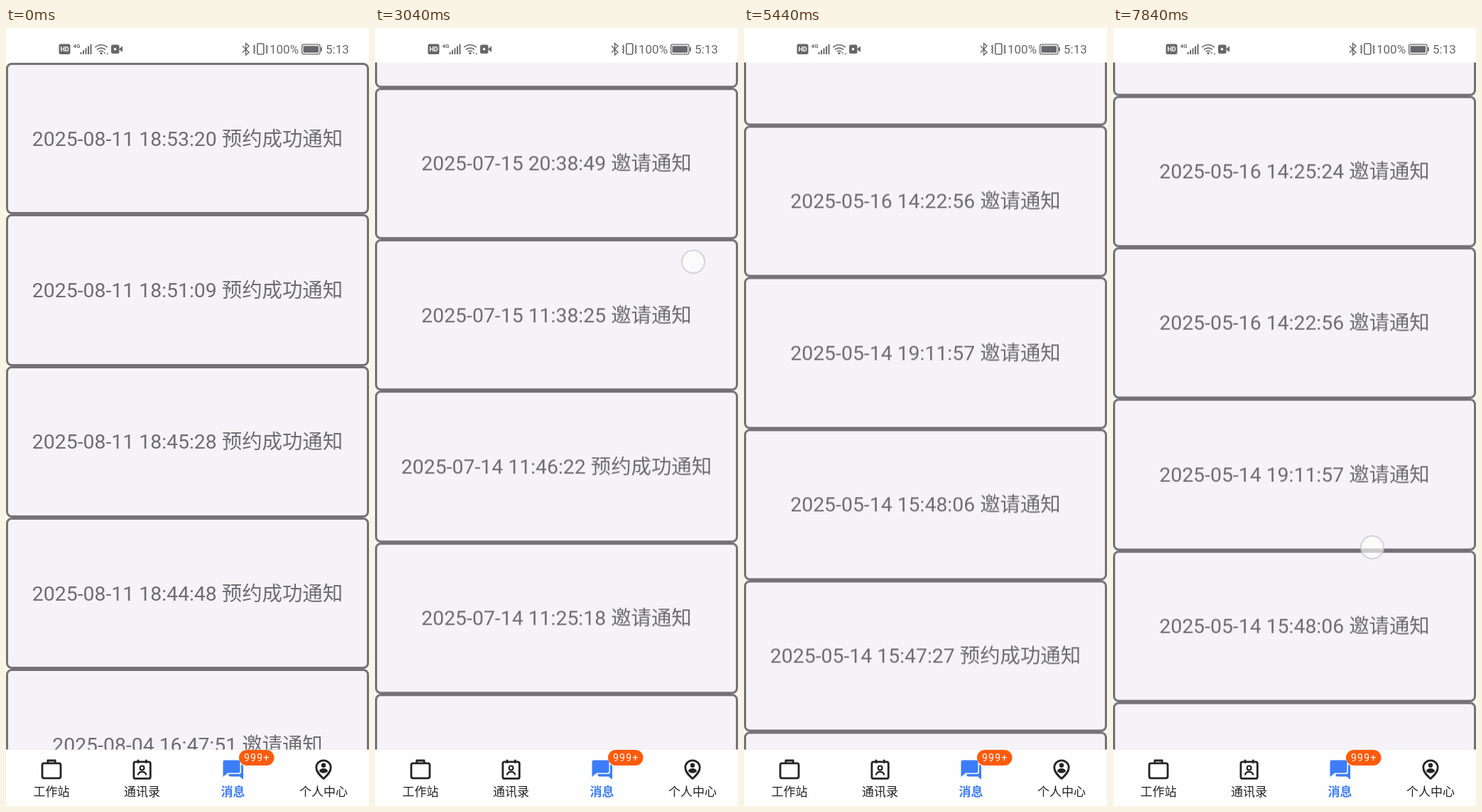
Recreate the animation shown at these times as an HTML page. Size 511 by 1095 pixels, loop 8000 ms.

```html
<!DOCTYPE html>
<html lang="zh-CN">
<head>
<meta charset="utf-8">
<title>消息</title>
<style>
html, body { margin: 0; width: 100%; height: 100%; overflow: hidden; background: #fff; }
body { position: relative; font-family: Roboto, "Noto Sans CJK SC", "Noto Sans CJK", sans-serif; }
#view { position: absolute; left: 0; top: 48px; width: 511px; height: 968px; overflow: hidden; }
#list { position: absolute; left: 0; top: .5px; width: 511px; will-change: transform; }
.row {
  box-sizing: border-box; height: 213.33px; padding-top: 1.6px;
  border: 3px solid #747277; border-radius: 8px; background: #f5f3f7;
  color: #6e6d72; font-size: 28.4px; line-height: 206px;
  text-align: center; white-space: nowrap;
}
#glow {
  position: absolute; left: -195px; top: 932px; width: 900px; height: 300px;
  border-radius: 50%; background: #e8e2e8; opacity: 0;
}
#chrome { position: absolute; left: 0; top: 0; display: block; }
text { font-family: Roboto, "Noto Sans CJK SC", "Noto Sans CJK", sans-serif; }
.status { fill: #68676b; }
.line { fill: none; stroke: #68676b; stroke-width: 1.6; }
.icon { fill: none; stroke: #242426; stroke-width: 2.8; stroke-linejoin: round; }
.label { font-size: 17px; text-anchor: middle; fill: #222; }
</style>
</head>
<body>
<div id="view">
  <div id="list"></div>
  <div id="glow"></div>
</div>
<svg id="chrome" width="511" height="1095" viewBox="0 0 511 1095">
  <!-- status bar -->
  <rect width="511" height="48.5" fill="#fff"/>
  <g class="status">
    <rect x="74.5" y="22.5" width="16" height="14.5" rx="2.5"/>
    <text x="82.5" y="33.2" font-size="9" font-weight="700" fill="#fff" text-anchor="middle">HD</text>
    <text x="94.5" y="28" font-size="8" font-weight="700">4G</text>
    <g id="bars"></g>
    <rect x="148" y="23.5" width="11.5" height="12.5" rx="2.5"/>
    <path d="M159 29.7 164 25.5V34Z"/>
    <circle cx="153.5" cy="29.7" r="1.8" fill="#fff"/>
    <circle cx="134" cy="35.6" r="1.7"/>
    <path d="M137.5 34h2v3.5zM141.5 37.5h2V34z"/>
    <text x="371" y="36" font-size="17">100%</text>
    <text x="450" y="36" font-size="17">5:13</text>
    <rect x="418.5" y="25.3" width="21.5" height="9.4" rx="1"/>
    <rect x="443" y="27" width="1.8" height="6" rx=".8"/>
  </g>
  <g class="line">
    <path d="M125.2 27.3a12.6 12.6 0 0 1 17.6 0M128 30.6a8.6 8.6 0 0 1 12 0M130.8 33.4a4.8 4.8 0 0 1 6.4 0"/>
    <path d="M333 25.2 342 34.2 337.6 38V21.5L342 25.4 333 34.4" stroke-width="1.4"/>
    <rect x="353.8" y="22" width="9" height="15" rx="1.5"/>
    <path d="M350.3 24l-1.4 2 1.4 2-1.4 2 1.4 2-1.4 2 1.4 2M366.4 24l1.4 2-1.4 2 1.4 2-1.4 2 1.4 2-1.4 2"/>
    <rect x="416.6" y="23.2" width="25.4" height="13.6" rx="2.5" stroke-width="1.3"/>
  </g>

  <!-- tab bar -->
  <rect y="1015.5" width="511" height="1" fill="#ececee"/>
  <rect y="1016" width="511" height="79" fill="#fefefe"/>
  <g class="icon">
    <rect x="51" y="1034.8" width="26" height="21" rx="2.5"/>
    <path d="M58.8 1034.5V1031h10.4v3.5"/>
    <rect x="179.9" y="1032.8" width="23.4" height="23.6" rx="2.5"/>
    <path d="M186 1029.8v5M197.3 1029.8v5"/>
    <circle cx="191.6" cy="1041.4" r="2.9" stroke-width="2.2"/>
    <path d="M185.8 1051.5c1-6.2 10.6-6.2 11.6 0" stroke-width="2.3"/>
    <path d="M447 1056.5c-5-4.500-10.200-9.300-10.200-15.500a10.200 10.200 0 0 1 20.400 0c0 6.200-5.200 11-10.200 15.500Z"/>
    <g fill="#242426" stroke="none">
      <circle cx="447" cy="1037.800" r="3.200"/>
      <path d="M440.800 1046c1.200-5.500 11.200-5.500 12.400 0-3.500 3.600-8.900 3.600-12.400 0Z"/>
    </g>
  </g>
  <g fill="#3d7dfa">
    <path d="M331 1037h1q2 0 2 2.500v18.300l-5-4.300h-13q-2.500 0-2.500-2.500v-1h14.500q3 0 3-3Z"/>
    <path d="M308 1030h19q3 0 3 3v13q0 3-3 3h-15l-7 6v-22q0-3 3-3Z" stroke="#fefefe" stroke-width="1"/>
  </g>
  <text class="label" x="64" y="1081">工作站</text>
  <text class="label" x="191.500" y="1081">通讯录</text>
  <text class="label" x="319.500" y="1081" font-weight="700" style="fill:#3d7dfa">消息</text>
  <text class="label" x="447" y="1081">个人中心</text>
  <rect x="328" y="1016" width="49.500" height="22" rx="11" fill="#ff5b0b"/>
  <text x="353.300" y="1032" font-size="14" letter-spacing="1.300" fill="#fff" text-anchor="middle">999+</text>

  <circle id="touch" r="16" fill="#fff" fill-opacity=".62" stroke="#c9c7d0" stroke-opacity=".75" stroke-width="2"/>
</svg>
<script>
const LOOP = 8000, TICK = 160;
const kinds = { b: "预约成功", i: "邀请", q: "快速会议", n: "新用户注册" };
const rows = `08-11 18:53:20 b|08-11 18:51:09 b|08-11 18:45:28 b|08-11 18:44:48 b
08-04 16:47:51 i|07-30 15:12:36 i|07-24 10:05:42 i|07-17 14:31:08 i
07-15 20:38:49 i|07-15 11:38:25 i|07-14 11:46:22 b|07-14 11:25:18 i
07-10 16:20:33 i|07-08 09:54:17 i|07-04 18:43:36 i|07-02 18:26:55 q
07-02 10:29:13 i|06-20 16:37:14 i|06-20 16:00:55 i|06-19 11:08:40 i
06-18 14:50:49 i|06-12 10:21:14 i|06-12 10:20:47 i|05-21 19:58:01 i
05-21 19:20:27 i|05-20 10:42:35 i|05-16 14:25:24 i|05-16 14:22:56 i
05-14 19:11:57 i|05-14 15:48:06 i|05-14 15:47:27 b|05-14 15:40:22 n`.split(/[|\n]/);

const $ = id => document.getElementById(id);
$("list").innerHTML = rows.map(r =>
  `<div class="row">2025-${r.slice(0, -2)} ${kinds[r.slice(-1)]}通知</div>`).join("");
$("bars").innerHTML = [0, 1, 2, 3, 4].map(i =>
  `<rect x="${104.5 + i * 3.5}" y="${34 - i * 2.8}" width="2" height="${3 + i * 2.8}"/>`).join("");

// [time, scroll offset, 1 when the list coasts to this point]
const scroll = [
  [0, 0], [2000, 0], [2240, 380], [2800, 1230.700, 1], [3040, 1671.700],
  [3840, 3060.600, 1], [4000, 3110], [4240, 3550], [4640, 3999.700, 1],
  [4800, 4276.700], [4880, 4435], [5760, 5860, 1], [7520, 5860], [7840, 5500.400], [8000, 5500.400]
];
// [start, end, x0, y0, x1, y1]
const swipes = [
  [2000, 2240, 425, 800, 440, 420], [2800, 3040, 430, 770, 448, 329],
  [4000, 4240, 390, 830, 405, 390], [4640, 4880, 366, 846, 384, 410.500],
  [7520, 7840, 352, 371, 365, 731]
];
const glow = [[0, 0], [5600, 0], [5760, .6], [6240, .25], [6400, 0], [8000, 0]];

const mix = (a, b, u) => a + (b - a) * u;
function valueAt(keys, t) {
  const n = keys.findIndex(k => k[0] > t);
  const [t0, a] = keys[n - 1], [t1, b, coast] = keys[n];
  const u = (t - t0) / (t1 - t0);
  return mix(a, b, coast ? 1 - (1 - u) ** 2 : u);
}

function draw() {
  const t = Math.floor(performance.now() % LOOP / TICK) * TICK;
  $("list").style.transform = `translateY(${-valueAt(scroll, t)}px)`;
  $("glow").style.opacity = valueAt(glow, t);
  const s = swipes.find(([a, b]) => t >= a && t <= b);
  $("touch").style.display = s ? "" : "none";
  if (s) {
    const u = (t - s[0]) / (s[1] - s[0]);
    $("touch").setAttribute("transform", `translate(${mix(s[2], s[4], u)} ${mix(s[3], s[5], u)})`);
  }
  requestAnimationFrame(draw);
}
draw();
</script>
</body>
</html>
```
